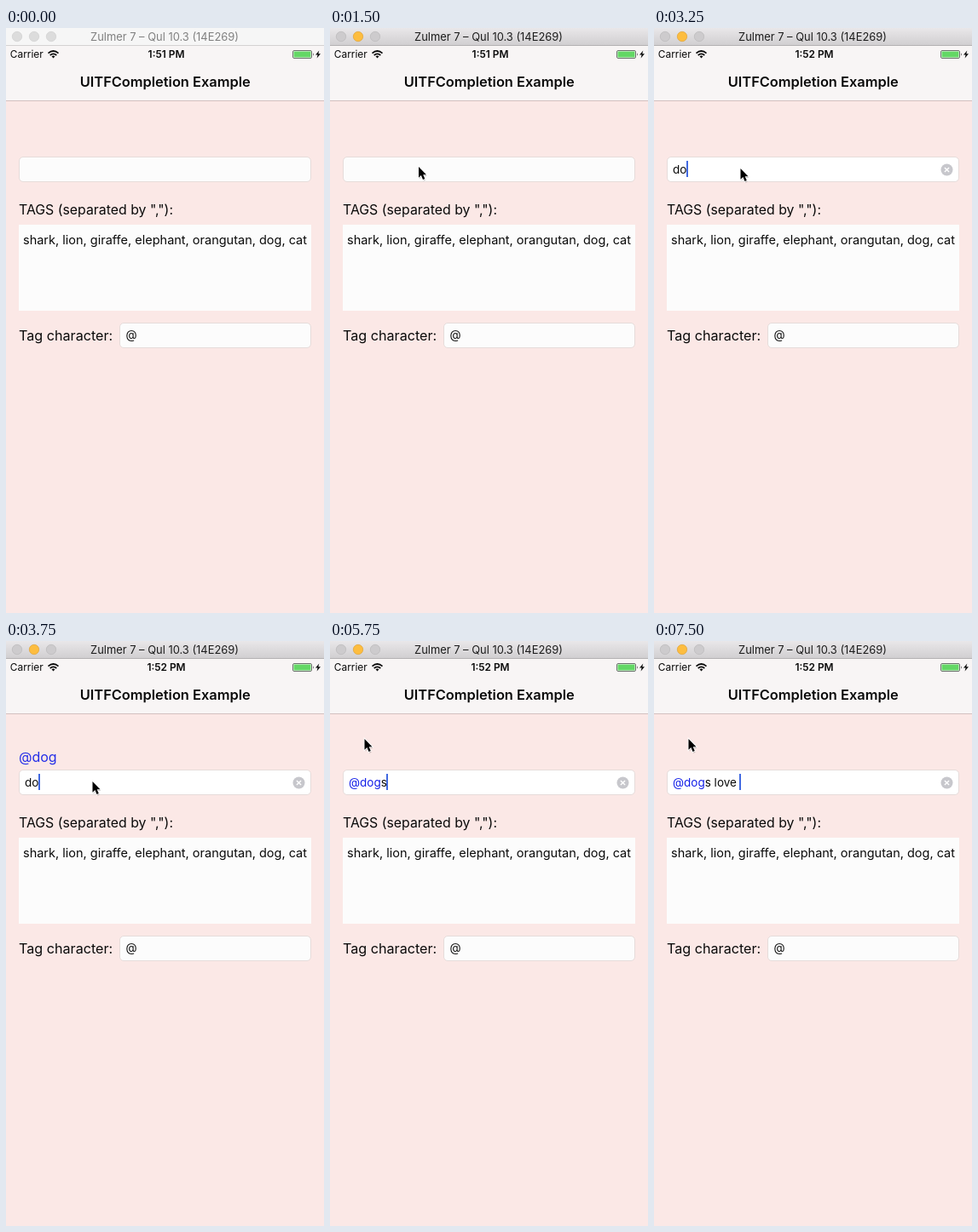
An HTML page that plays this animation: 373 px wide and 687 px high, repeating every 8 s.

```html
<!DOCTYPE html>
<html lang="en">
<head>
<meta charset="utf-8">
<title>Tag completion demo</title>
<style>
  html, body { margin: 0; width: 100%; height: 100%; overflow: hidden; background: #fbe8e6; }
  svg { display: block; width: 373px; height: 687px; }
  text { font: 16px Inter, "Open Sans", sans-serif; fill: #0a0a0a; white-space: pre; }
  .mid { text-anchor: middle; }
  .field { fill: #fcfcfc; stroke: #e6dcda; }
  .blue { fill: #1420e8; }
  #title { font-size: 12.9px; }
  .status { font-size: 11.9px; }
  .bold { font-weight: 600; }
  .nav { font-size: 16.4px; }
  .heading { font-size: 15.85px; }
  .label { font-size: 16.15px; }
  .list { font-size: 14.5px; }
  .input { font-size: 13.5px; }
</style>
</head>
<body>
<svg viewBox="0 0 373 687">
  <defs>
    <linearGradient id="chrome" x2="0" y2="1">
      <stop stop-color="#e9e7e9"/><stop offset="1" stop-color="#d1cfd1"/>
    </linearGradient>
    <path id="arrow" d="M0 0V12.8L2.9 10.1L5 15L7.3 14L5.2 9.3H9Z"/>
  </defs>
  <rect width="373" height="687" fill="#fbe8e6"/>

  <rect id="bar" width="373" height="20"/>
  <rect id="barLine" y="20" width="373" height="1"/>
  <g id="lights">
    <circle cx="13" cy="10" r="5.7"/><circle cx="33" cy="10" r="5.7"/><circle cx="53" cy="10" r="5.7"/>
  </g>
  <text id="title" class="mid" x="186" y="15">Zulmer 7 – Qul 10.3 (14E269)</text>

  <rect y="21" width="373" height="64" fill="#f8f5f5"/>
  <rect y="85" width="373" height="1" fill="#d3c0bf"/>
  <text class="status" x="4.8" y="35">Carrier</text>
  <g fill="none" stroke="#0a0a0a" stroke-width="1.7">
    <path d="M49.5 29.6Q55.5 24.4 61.5 29.6M51.7 32Q55.5 28.7 59.3 32"/>
    <path d="M53.5 33.2Q55.5 31.6 57.5 33.2L55.5 35.4Z" fill="#0a0a0a" stroke="none"/>
  </g>
  <text id="clock" class="status bold mid" x="188" y="35"></text>
  <rect x="336.5" y="26.5" width="22" height="9" rx="1.5" fill="#fff" stroke="#6c706c"/>
  <rect x="337.5" y="27.5" width="20" height="7" fill="#63d765"/>
  <path d="M360 29.3Q361.8 31 360 32.7Z" fill="#444"/>
  <path d="M367.3 26.5L363 31.6H365.6L364.6 35.6L369 30.2H366.3Z" fill="#0a0a0a"/>
  <text class="nav bold mid" x="186.7" y="69">UITFCompletion Example</text>

  <text id="hint" class="blue" x="15" y="142"></text>
  <rect id="field" class="field" x="15.5" y="151.5" width="342" height="29" rx="4.5"/>
  <text class="input" x="22" y="171" xml:space="preserve"><tspan id="tag" class="blue"></tspan><tspan id="typed"></tspan></text>
  <rect id="caret" y="156" width="2" height="19" fill="#4169e1"/>
  <g id="clear">
    <circle cx="343.5" cy="166.5" r="7" fill="#c7c7cc"/>
    <path d="M340.9 163.9l5.2 5.2m0-5.2l-5.2 5.2" stroke="#fff" stroke-width="1.4"/>
  </g>

  <text class="heading" x="15" y="219">TAGS (separated by ","):</text>
  <rect x="15" y="231" width="343" height="101" fill="#fcfcfc"/>
  <text class="list" x="20" y="254">shark, lion, giraffe, elephant, orangutan, dog, cat</text>
  <text class="label" x="15" y="367">Tag character:</text>
  <rect class="field" x="133.5" y="346.5" width="224" height="29" rx="4.5"/>
  <text class="input" x="140.4" y="365">@</text>

  <g id="mouse">
    <use href="#arrow" x=".8" y="1.8" opacity=".2"/>
    <use href="#arrow" stroke="#fff" stroke-width="1.6" paint-order="stroke"/>
  </g>
</svg>
<script>
const LOOP = 8000;
const $ = id => document.getElementById(id);
const start = {
  active: false, mouse: null, clock: "1:51 PM", tag: "", typed: "",
  caret: false, hint: "", fade: 1
};

// Each step changes part of the state and holds until the next one.
const steps = [
  [750, { mouse: [149, 82] }],
  [1000, { mouse: [109, 155] }],
  [1250, { mouse: [105, 162] }],
  [1500, { active: true, mouse: [104, 163] }],
  [1750, { mouse: [101.5, 165], caret: true }],
  [2250, { caret: false }],
  [2500, { clock: "1:52 PM" }],
  [2750, { caret: true }],
  [3250, { typed: "do" }],
  [3500, { hint: "@dog", fade: .4 }],
  [3750, { fade: .93 }],
  [4000, { fade: 1, caret: false }],
  [4500, { mouse: [25.5, 122], caret: true }],
  [4750, { mouse: [31, 124] }],
  [5000, { hint: "", tag: "@dog", typed: "", caret: false }],
  [5250, { mouse: [40.5, 115], caret: true }],
  [5500, { caret: false }],
  [5750, { typed: "s", caret: true }],
  [6250, { typed: "s " }],
  [6750, { typed: "s l" }],
  [7000, { typed: "s love", caret: false, hint: "@lion", fade: .25 }],
  [7250, { hint: "", caret: true }],
  [7500, { typed: "s love " }]
];

const set = (node, attrs) => {
  for (const name in attrs) node.setAttribute(name, attrs[name]);
};
const show = (node, on) => set(node, { visibility: on ? "visible" : "hidden" });

const ruler = document.createElement("canvas").getContext("2d");
ruler.font = '13.5px Inter, "Open Sans", sans-serif';

function draw(time) {
  const s = Object.assign({}, start, ...steps.filter(step => step[0] <= time).map(step => step[1]));

  set($("bar"), { fill: s.active ? "url(#chrome)" : "#f6f6f6" });
  set($("barLine"), { fill: s.active ? "#b3b1b3" : "#d4d2d2" });
  [...$("lights").children].forEach((light, i) => {
    const lit = s.active && i === 1;
    set(light, {
      fill: lit ? "#fdbd3f" : s.active ? "#cdcbcd" : "#dcdcdc",
      stroke: lit ? "#e0a336" : s.active ? "#bbb9bb" : "#d0d0d0",
      "stroke-width": .7
    });
  });
  $("title").style.fill = s.active ? "#1c1c1c" : "#808080";

  $("clock").textContent = s.clock;
  $("hint").textContent = s.hint;
  set($("hint"), { opacity: s.fade });
  $("tag").textContent = s.tag;
  $("typed").textContent = s.typed;

  const text = s.tag + s.typed;
  $("field").style.fill = text ? "#fff" : "#fcfcfc";
  show($("clear"), text);
  show($("caret"), s.caret);
  set($("caret"), { x: Math.round(21.5 + ruler.measureText(text).width) });

  show($("mouse"), s.mouse);
  if (s.mouse) set($("mouse"), { transform: `translate(${s.mouse})` });
}

const origin = performance.now();
let last = -1;
function tick(now) {
  const time = Math.max(0, now - origin) % LOOP;
  const slot = Math.floor(time / 250);
  if (slot !== last) draw(time);
  last = slot;
  requestAnimationFrame(tick);
}
draw(0);
requestAnimationFrame(tick);
</script>
</body>
</html>
```
